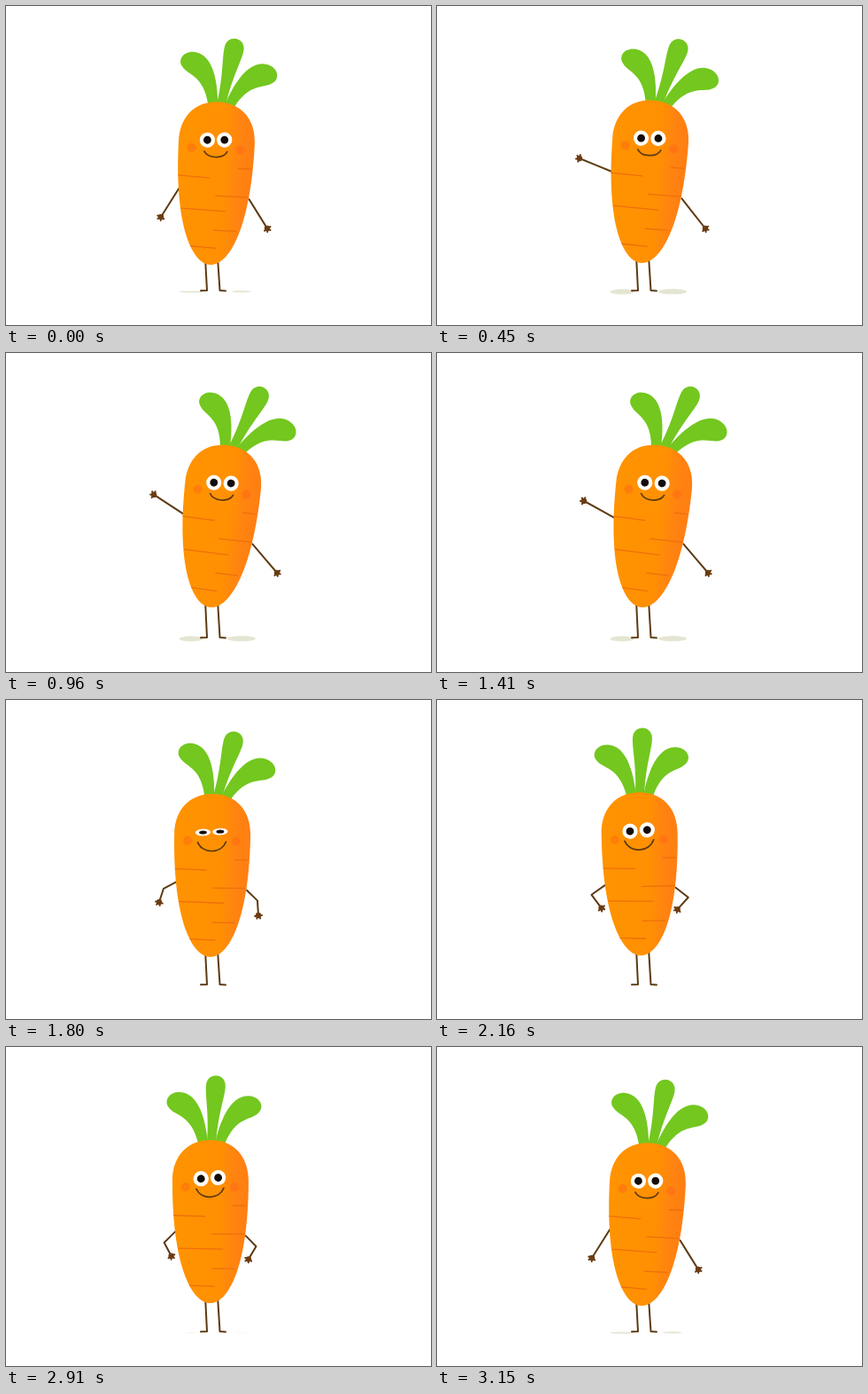
Write an HTML page with a canvas that moves like this. It is 480 px wide and 360 px high and loops after 3.33 s.

```html
<!DOCTYPE html>
<html lang="en">
<head>
<meta charset="utf-8">
<title>Waving carrot</title>
<style>
html, body { margin: 0; width: 100%; height: 100%; overflow: hidden; background: #fff; }
canvas { display: block; }
</style>
</head>
<body>
<canvas id="stage" width="480" height="360"></canvas>
<script>
const ctx = document.getElementById('stage').getContext('2d');
const LOOP = 3330, STEP = 30, RAD = Math.PI / 180;
const BROWN = '#5c3a12', GREEN = '#73c71f';

// time, tilt, tip y, leaf angle, leaf shift, smile
const restBody = [3, 292, 13, 3.5, 0];
const leanBody = [6, 287, 27, 8, 0];
const hipsBody = [-1, 288, 1, 0.5, 1];
const bodyKeys = [
  [0, ...restBody], [180, ...restBody],
  [450, 4.3, 290, 20, 7, 0],
  [690, ...leanBody], [1470, ...leanBody],
  [1800, 1, 290, 16, 6, 0.85],
  [2280, ...hipsBody], [2800, ...hipsBody],
  [3120, ...restBody], [LOOP, ...restBody]
];

// time, left shoulder y, elbow bend, left hand x y, right hand x y
const restArms = [-84, 0, 175, 238, 295, 251];
const hipsArms = [-79, 14, 191, 235, 266, 235];
const armKeys = [
  [0, ...restArms], [180, ...restArms],
  [320, -93, 0, 157, 199, 299, 251],
  [450, -100, 0, 161, 172, 303, 251],
  [670, -102, 0, 179, 149, 306, 248],
  [950, -101, 0, 167, 160, 306, 248],
  [1190, -102, 0, 179, 149, 306, 248],
  [1410, -97, 0, 166, 167, 306, 248],
  [1570, -92, 0, 157, 196, 301, 248],
  [1800, -84, 6, 173, 228, 285, 243],
  [1920, -83, 9, 170, 232, 288, 241],
  [2280, ...hipsArms], [2800, ...hipsArms],
  [3120, ...restArms], [LOOP, ...restArms]
];

const eyeKeys = [[0, 1], [1680, 1], [1800, 0.45], [1840, 0.3], [1960, 1], [LOOP, 1]];
const shadowKeys = [[0, 0.35], [180, 0.35], [450, 1], [1500, 1], [1780, 0],
  [2850, 0], [3120, 0.35], [LOOP, 0.35]];

// Lines across the skin: x1 y1 x2 y2, measured from the tip
const creases = [[-43, -99, -6, -98], [26, -110, 40, -110], [2, -78, 40, -78],
  [-36, -62, 14, -61], [2, -39, 27, -39], [-24, -20, 5, -19]];

const skin = new Path2D('M0 0C-20 0-43-40-43-138C-43-166-26-184 0-184C26-184 43-166 43-138C43-40 20 0 0 0Z');
const midLeaf = new Path2D('M-5 4C-5-30-11-48-11-61C-11-77 11-77 11-61C11-48 5-30 5 4Z');
const sideLeaf = new Path2D('M-6 4C-2-26 8-53 28-53C41-53 47-41 39-34C32-26 14-28 5 4Z');

const shade = ctx.createLinearGradient(-43, 0, 43, 0);
shade.addColorStop(0, '#ff9300');
shade.addColorStop(0.62, '#ff9002');
shade.addColorStop(0.8, '#ff8410');
shade.addColorStop(1, '#ff7e12');

// Smooth curve through the keys that never overshoots them
function at(keys, t) {
  const i = keys.findIndex(k => k[0] > t), a = keys[i - 1], b = keys[i];
  const span = b[0] - a[0], u = (t - a[0]) / span;
  const slope = (k, j) => {
    const p = keys[k - 1], c = keys[k], n = keys[k + 1];
    if (!p || !n) return 0;
    const before = (c[j] - p[j]) / (c[0] - p[0]), after = (n[j] - c[j]) / (n[0] - c[0]);
    return before * after > 0 ? 2 * before * after / (before + after) : 0;
  };
  return a.slice(1).map((v, n) => {
    const j = n + 1, w = 1 - u;
    return v * w * w * (1 + 2 * u) + b[j] * u * u * (3 - 2 * u)
      + span * u * w * (slope(i - 1, j) * w - slope(i, j) * u);
  });
}

function oval(x, y, rx, ry, color) {
  ctx.fillStyle = color;
  ctx.beginPath();
  ctx.ellipse(x, y, rx, ry, 0, 0, 7);
  ctx.fill();
}

function line(points, color, width) {
  ctx.strokeStyle = color;
  ctx.lineWidth = width;
  ctx.beginPath();
  points.forEach(p => ctx.lineTo(...p));
  ctx.stroke();
}

function placed(x, y, degrees, draw, flip = 1) {
  ctx.save();
  ctx.translate(x, y);
  ctx.rotate(degrees * RAD);
  ctx.scale(flip, 1);
  draw();
  ctx.restore();
}

function arm(sx, sy, hx, hy, bend) {
  const dx = hx - sx, dy = hy - sy, len = Math.hypot(dx, dy);
  const ex = (sx + hx) / 2 - bend * dy / len, ey = (sy + hy) / 2 + bend * dx / len;
  line([[sx, sy], [ex, ey], [hx, hy]], BROWN, 2);
  oval(hx, hy, 3.2, 3.2, '#6b3d14');
  const dir = Math.atan2(hy - ey, hx - ex);
  for (const f of [-1.5, -0.5, 0.5, 1.4]) {
    line([[hx, hy], [hx + 4 * Math.cos(dir + f), hy + 4 * Math.sin(dir + f)]], '#6b3d14', 2);
  }
}

function face(smile, open) {
  for (const x of [-28, 27]) oval(x, -131, 5, 5, 'rgba(255,100,24,.45)');
  placed(-1, -141, -3.5, () => {
    for (const x of [-9.7, 9.7]) {
      oval(x, 0, 8.6, 8.6 * open, '#fff');
      oval(x, 0, 4.4, 4.4 * open, '#140c08');
    }
  });
  placed(-0.5, -128 - 2 * smile, -2, () => {
    const w = 13 + 3.5 * smile, d = 8.5 + 6 * smile;
    ctx.strokeStyle = BROWN;
    ctx.lineWidth = 1.7;
    ctx.beginPath();
    ctx.moveTo(-w, 0);
    ctx.bezierCurveTo(-w * 0.65, d, w * 0.65, d, w, 0);
    ctx.stroke();
  });
}

function draw(t) {
  const [tilt, tipY, leaf, shift, smile] = at(bodyKeys, t);
  const [shoulder, bend, lx, ly, rx, ry] = at(armKeys, t);
  const [open] = at(eyeKeys, t), [shadow] = at(shadowKeys, t);
  const tipX = 230.7, sin = Math.sin(tilt * RAD), cos = Math.cos(tilt * RAD);
  const local = (x, y) => [tipX + x * cos - y * sin, tipY + x * sin + y * cos];

  ctx.fillStyle = '#fff';
  ctx.fillRect(0, 0, 480, 360);
  ctx.lineCap = ctx.lineJoin = 'round';

  if (shadow > 0.01) {
    oval(209, 322.5, 13.5, 3 * shadow, '#e4e5d2');
    oval(266, 322.3, 8 + 8 * shadow, 3 * shadow, '#e4e5d2');
  }

  line([[225, tipY - 8], [227, 321], [220, 321.3]], BROWN, 2);
  line([[239, tipY - 8], [241.5, 321], [248, 321.5]], BROWN, 2);
  arm(...local(-40, shoulder), lx, ly, bend);
  arm(...local(40, -76), rx, ry, -bend);

  const [topX, topY] = local(0, -184);
  ctx.fillStyle = GREEN;
  const x = topX + shift;
  placed(x - 10, topY, leaf * 0.6, () => ctx.fill(sideLeaf), -1);
  placed(x + 10, topY + leaf * 0.1, leaf * 1.2, () => ctx.fill(sideLeaf));
  placed(x, topY, leaf, () => ctx.fill(midLeaf));

  placed(tipX, tipY, tilt, () => {
    ctx.fillStyle = shade;
    ctx.fill(skin);
    ctx.save();
    ctx.clip(skin);
    for (const [x1, y1, x2, y2] of creases) line([[x1, y1], [x2, y2]], '#ee6f0c', 1.3);
    ctx.restore();
    face(smile, open);
  });
}

function tick() {
  const t = performance.now() % LOOP;
  draw(Math.floor(t / STEP) * STEP);
  requestAnimationFrame(tick);
}
tick();
</script>
</body>
</html>
```
